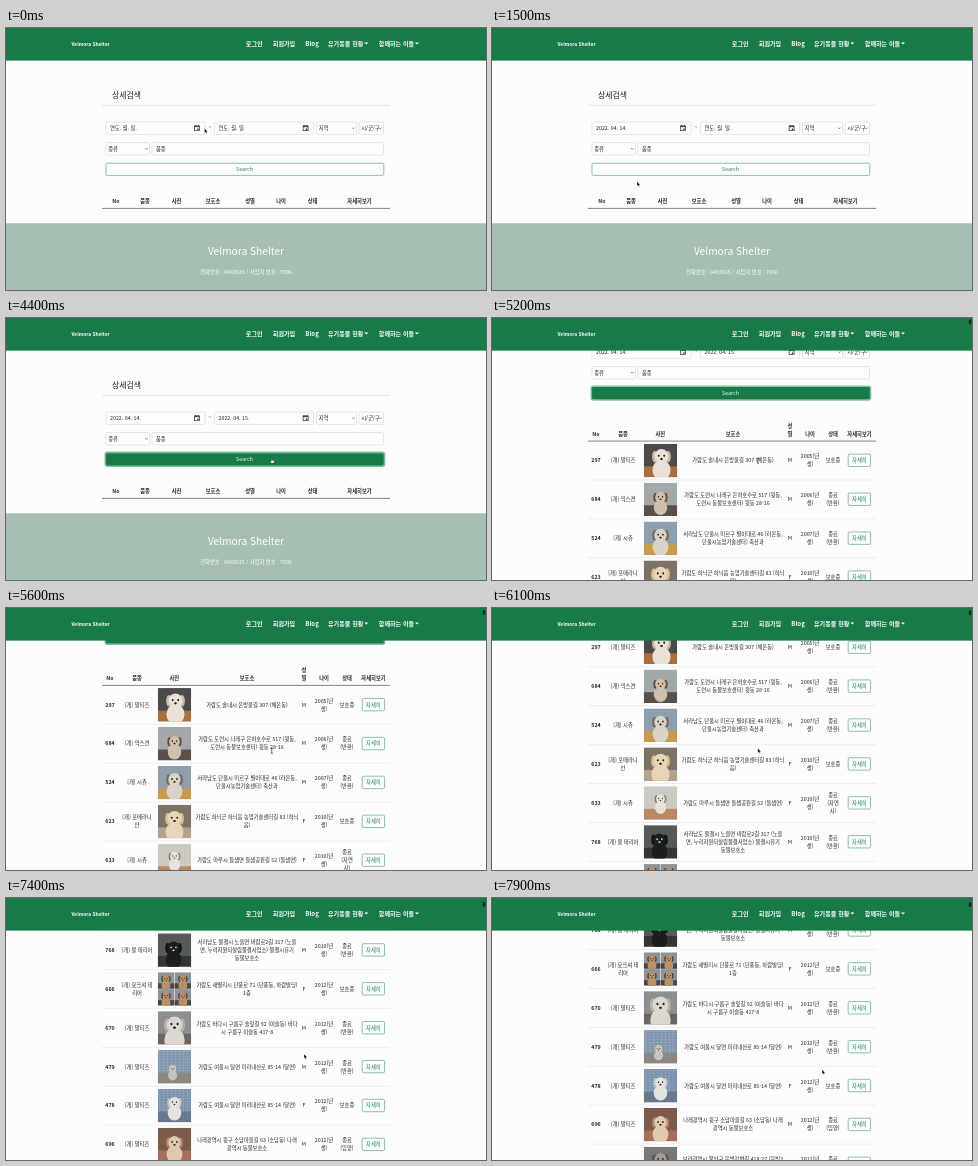
Recreate the animation shown at these times as an HTML page. Size 480 by 262 pixels, loop 8000 ms.

```html
<!DOCTYPE html>
<html lang="ko">
<head>
<meta charset="utf-8">
<title>상세검색</title>
<style>
html, body { margin: 0; width: 100%; height: 100%; overflow: hidden; background: #fcfcfc; }
svg { display: block; }
text { font-family: "Noto Sans CJK KR", "Noto Sans CJK", "Noto Sans", sans-serif; white-space: pre; }
</style>
</head>
<body>
<svg id="stage" width="100%" height="100%" viewBox="0 0 480 262"></svg>
<script>
const LOOP = 8000, ROW = 38.9, TOP = 189.2;
const GREEN = '#187a47', INK = '#23272b', BORDER = '#c9cdd2';
const BRAND = 'Velmora Shelter';
const $ = id => document.getElementById(id);

// y is the visual middle of the line
const text = (s, x, y, o = {}) => {
  const { size = 5.3, fill = INK, weight = 400, anchor = 'start' } = o;
  return `<text x="${x}" y="${y + size * 0.37}" font-size="${size}" fill="${fill}" font-weight="${weight}" text-anchor="${anchor}">${s}</text>`;
};
const mid = (s, x, y, o) => text(s, x, y, { anchor: 'middle', ...o });
const lines = (s, x, y, o) => {
  const parts = s.split('/');
  return parts.map((p, i) => mid(p, x, y + (i - (parts.length - 1) / 2) * 8, o)).join('');
};
const rect = (x, y, w, h, fill, more = '') =>
  `<rect x="${x}" y="${y}" width="${w}" height="${h}" fill="${fill}" ${more}/>`;
const rule = (y, color, w = 0.5) =>
  `<path d="M96 ${y}H384" stroke="${color}" stroke-width="${w}"/>`;
const box = (x, y, w, h = 12.4) =>
  rect(x, y, w, h, '#fff', `fill-opacity=".5" rx="1.3" stroke="${BORDER}" stroke-width=".5"`);
const dot = (x, y, rx, ry, fill) =>
  `<ellipse cx="${x}" cy="${y}" rx="${rx}" ry="${ry}" fill="${fill}"/>`;

const dateField = (x, id) => box(x, 94, 99) +
  `<g id="${id}"></g>` +
  `<g transform="translate(${x + 88.3} 97.2)">
    <rect x=".3" y=".7" width="5" height="4.8" fill="none" stroke="#111" stroke-width=".6"/>
    <path d="M.3 1.5H5.3M1.4 0V1M4.2 0V1" stroke="#111" stroke-width=".8"/>
    <rect x="3" y="3.4" width="1.4" height="1.3" fill="#111"/></g>`;
const select = (x, y, w, label) => box(x, y, w) + text(label, x + 2.2, y + 6.2) +
  `<path d="M${x + w - 4.4} ${y + 5.5}l1.3 1.3l1.3 -1.3" fill="none" stroke="#444" stroke-width=".6"/>`;

function form() {
  return text('상세검색', 106, 67, { size: 7.9 }) + rule(77.3, '#c8c8c8') +
    dateField(100, 'date1') + mid('~', 204, 99) + dateField(208.5, 'date2') +
    select(310.5, 94, 40, '지역') + select(353, 94, 24.5, '시/군/구') +
    select(100, 114.6, 43.5, '종류') + box(146, 114.6, 231.5) + text('품종', 150, 120.8) +
    rect(99.2, 134.2, 279.4, 14, 'none', 'id="ring" rx="2" stroke="#198754" stroke-opacity=".5" stroke-width="1.4"') +
    rect(100, 135.2, 277.8, 12.2, 'none', 'id="btn" rx="1.3" stroke="#198754" stroke-width=".5"') +
    `<g id="btnText">${mid('Search', 238.5, 141.3, { fill: 'inherit' })}</g>`;
}

const HEADS = ['No', '품종', '사진', '보호소', '성별', '나이', '상태', '자세히보기'];
const WIDE = [110, 139, 170.5, 207, 244, 275, 306.5, 353.5];
const COLS = [104, 131, 168.3, 241, 298, 318, 341, 367.5];

function emptyTable() {
  return HEADS.map((h, i) => mid(h, WIDE[i], 173.5, { weight: 700 })).join('') +
    rule(180.4, '#333', 0.6) +
    rect(0, 195.3, 480, 67, '#a5bfb2') +
    mid(BRAND, 240, 223.7, { size: 10.2, fill: '#fff' }) +
    mid('전화번호 : 0483615 / 사업자 번호 : 7096', 240, 244, { fill: '#fff' });
}

const ANIMALS = [
  '297|[개] 말티즈|가람도 솔내시 은방울길 307 (해온동)|M|2005|보호중',
  '684|[개] 믹스견|가람도 도련시 나래구 은하호수로 517 (윗동,/도련시 동물보호센터) 윗동 28-16|M|2006|종료/(반환)',
  '524|[개] 시츄|서라남도 단울시 미르구 별이대로 46 (라온동,/단울시농업기술센터) 축산과|M|2007|종료/(반환)',
  '623|[개] 포메라니/안|가람도 하늬군 하늬읍 농업기술센터길 83 (하늬/읍)|F|2010|보호중',
  '633|[개] 시츄|가람도 마루시 들샘면 들샘공원길 52 (들샘면)|F|2010|종료/(자연/사)',
  '768|[개] 불 테리어|서라남도 물결시 노을면 바람로2길 317 (노을/면, 누리자원되살림물결사업소) 물결시유기/동물보호소|M|2010|종료/(반환)',
  '666|[개] 요크셔 테/리어|가람도 새별리시 단풍로 71 (단풍동, 하람빌딩)/1층|F|2012|보호중',
  '670|[개] 말티즈|가람도 바다시 구름구 솔잎길 92 (이슬동) 바다/시 구름구 이슬동 417-8|M|2012|종료/(반환)',
  '479|[개] 말티즈|가람도 여울시 달면 미리내산로 85-14 (달면)|M|2012|종료/(반환)',
  '478|[개] 말티즈|가람도 여울시 달면 미리내산로 85-14 (달면)|F|2012|보호중',
  '696|[개] 말티즈|나래광역시 윗구 소담마을길 63 (소담동) 나래/광역시 동물보호소|M|2012|종료/(입양)',
  '702|[개] 푸들|보라광역시 물안구 은빛강변길 418-27 (은빛2/동)|M|2012|종료/(반환)'
].map(s => s.split('|'));

// wall, floor, fur, ears, head x, head y, head radius, kind
const PHOTOS = [
  ['#4b4a49', '#a8703f', '#e9e1d6', '#c9b8a4', 18, 13, 8],
  ['#a3a8aa', '#59504b', '#cfc0ae', '#6a4a38', 17, 15, 6],
  ['#8fa0ad', '#c79a4c', '#d9d2c8', '#77685b', 17, 14, 7],
  ['#7d7266', '#b3a28c', '#e8d5b5', '#d8bd92', 17, 14, 8],
  ['#c9c6bf', '#b88a61', '#e6e2db', '#85766a', 17, 13, 5, 'cage'],
  ['#55595a', '#343636', '#1c1d1e', '#101112', 16, 15, 7],
  ['#8d9396', '#4a4541', '#b89068', '#3d322b', 17, 14, 8, 'grid'],
  ['#8b8f90', '#6b6661', '#dcd8d1', '#b8b0a6', 17, 14, 9],
  ['#7e94ad', '#8c8781', '#c8c4bd', '#9c948a', 15, 19, 4, 'cage'],
  ['#7890ad', '#69788c', '#e4e2de', '#c5c0b8', 17, 14, 6, 'cage'],
  ['#7d5a49', '#a56f58', '#e0c9b2', '#b98a6c', 17, 15, 7],
  ['#777879', '#4d4946', '#a39a92', '#5b504a', 17, 13, 7]
];

function pet(fur, ear, x, y, r) {
  const eye = fur === '#1c1d1e' ? '#d8d8d4' : '#1d1917';
  return dot(x, y + r * 1.7, r * 1.15, r * 1.3, fur) +
    dot(x - r * 0.85, y, r * 0.35, r * 0.75, ear) + dot(x + r * 0.85, y, r * 0.35, r * 0.75, ear) +
    dot(x, y, r * 0.9, r * 0.95, fur) +
    dot(x - r * 0.35, y - r * 0.1, r * 0.12, r * 0.14, eye) + dot(x + r * 0.35, y - r * 0.1, r * 0.12, r * 0.14, eye) +
    dot(x, y + r * 0.32, r * 0.17, r * 0.13, eye);
}

function photo([wall, floor, fur, ear, x, y, r, kind], top) {
  let scene = rect(0, 0, 34, 34, wall) + rect(0, 23, 34, 11, floor) + pet(fur, ear, x, y, r);
  if (kind === 'cage')
    for (let i = 2; i < 34; i += 4)
      scene += `<path d="M${i} 0V24M0 ${i * 0.7}H34" stroke="#eef2f6" stroke-opacity=".35" stroke-width=".4"/>`;
  if (kind === 'grid') {
    const tile = scene;
    scene = '';
    for (let i = 0; i < 4; i++)
      scene += `<g transform="translate(${i % 2 * 17.2} ${(i >> 1) * 17.2}) scale(.49)">${tile}</g>`;
  }
  return `<svg x="151.8" y="${top}" width="33.4" height="33.4" viewBox="0 0 34 34">${scene}</svg>`;
}

function results() {
  let out = HEADS.map((h, i) => h === '성별'
    ? mid('성', COLS[i], 174, { weight: 700 }) + mid('별', COLS[i], 182, { weight: 700 })
    : mid(h, COLS[i], 182, { weight: 700 })).join('') + rule(TOP, '#333', 0.6);
  ANIMALS.forEach(([no, breed, place, sex, year, state], i) => {
    const top = TOP + i * ROW, y = top + ROW / 2 - 0.2;
    out += mid(no, COLS[0], y, { weight: 700 }) + lines(breed, COLS[1], y) +
      photo(PHOTOS[i], top + 2.7) + lines(place, COLS[3], y) + mid(sex, COLS[4], y) +
      lines(year + '(년/생)', COLS[5], y) + lines(state, COLS[6], y) +
      rect(356.2, y - 6.2, 22.4, 12.4, 'none', 'rx="1.3" stroke="#198754" stroke-width=".5"') +
      mid('자세히', 367.4, y, { fill: '#198754' }) + rule(top + ROW, '#dadee2');
  });
  return out;
}

const cellX = c => 8.6 + c * 9.25, cellY = r => 28.5 + r * 9.4;

function calendar() {
  const arrow = (x, d) => `<path d="M${x} ${7.5 - 2.6 * d}V${7.5 + 2.6 * d}M${x - 2.5} ${7.5}L${x} ${7.5 - 2.6 * d}L${x + 2.5} 7.5" fill="none" stroke="#444" stroke-width=".6"/>`;
  let out = rect(0.8, 1.4, 72.5, 92.5, '#000', 'opacity=".22" filter="url(#blur)"') +
    rect(0, 0, 72.5, 92.6, '#fff', 'stroke="#a8a8a8" stroke-width=".6"') +
    text('2022년 4월', 3.4, 7.2, { size: 4, weight: 700 }) +
    '<path d="M24 6.4h2.8l-1.4 1.8z" fill="#222"/>' + arrow(53.7, 1) + arrow(64, -1) +
    rect(0, 0, 9.2, 9.2, '#eee', 'id="cell"');
  [...'일월화수목금토'].forEach((d, c) => out += mid(d, cellX(c), 19.2, { size: 4 }));
  for (let i = 0; i < 42; i++) {
    const n = i < 5 ? 27 + i : i < 35 ? i - 4 : i - 34;
    const fill = i < 5 || i > 34 ? '#8a8a8a' : '#222';
    out += `<g class="day" fill="${fill}">${mid(n, cellX(i % 7), cellY(i / 7 | 0), { size: 4, fill: 'inherit' })}</g>`;
  }
  return out + rect(cellX(4) - 4.6, cellY(4) - 4.6, 9.2, 9.2, 'none', 'stroke="#777" stroke-width=".6"') +
    mid('삭제', 10.8, 85.4, { size: 4, fill: '#1a6bc4' }) + mid('오늘', 61.8, 85.4, { size: 4, fill: '#1a6bc4' });
}

function navbar() {
  const item = (s, x) => text(s, x, 15.6, { size: 6.1, weight: 900, fill: '#fff' });
  const caret = x => `<path d="M${x} 14.4h4l-2 2z" fill="#fff"/>`;
  return rect(0, 0, 480, 32.6, GREEN) +
    text(BRAND, 65.5, 15.8, { size: 4.8, weight: 700, fill: '#fff' }) +
    item('로그인', 239.8) + item('회원가입', 266.8) + item('Blog', 299.3) +
    item('유기동물 현황', 322) + caret(358.3) + item('함께하는 이들', 372.8) + caret(409);
}

$('stage').innerHTML = `
  <defs><filter id="blur" x="-20%" y="-20%" width="140%" height="140%"><feGaussianBlur stdDeviation="1.4"/></filter></defs>
  ${rect(0, 0, 480, 262, '#fcfcfc')}
  <g id="page">${form()}<g id="empty">${emptyTable()}</g><g id="list">${results()}</g></g>
  <g id="cal">${calendar()}</g>
  ${navbar()}
  ${rect(476.8, 1, 2.4, 5, '#222', 'id="thumb" rx="1.2"')}
  <g id="pointer">
    <path id="arrow" d="M0 0V4.6L1.1 3.7L1.8 5.3L2.6 4.9L1.9 3.4H3.3Z" fill="#000" stroke="#fff" stroke-width=".4"/>
    <path id="hand" d="M-.5 .4Q0 -.3 .5 .4V1.9L2.2 2.3Q2.7 2.5 2.6 3.2L2.2 5H-.5L-1.9 3.2Q-1.8 2.4 -.5 3Z" fill="#fff" stroke="#111" stroke-width=".45"/>
    <path id="beam" d="M-.9 0Q0 0 0 .6Q0 0 .9 0M0 .5V4.6M-.9 5.1Q0 5.1 0 4.5Q0 5.1 .9 5.1" fill="none" stroke="#111" stroke-width=".6"/>
  </g>`;

const SCROLL = [[4800, 0], [5200, 66], [5500, 102], [5850, 136], [6100, 169], [6500, 256.2], [6800, 300], [7300, 347], [7900, 371]];
const MOVES = [
  [100, 198.5, 100.3], [300, 191, 99.5], [500, 191, 99.5], [1100, 145, 153.5], [1600, 145, 153.5],
  [2100, 299.5, 99.5], [2300, 299.5, 99.5], [2700, 271.5, 152.5], [2900, 264, 153.5], [3300, 264, 153.5],
  [4000, 265.8, 140.3], [6900, 265.8, 140.3], [7900, 330, 171.5]
];

function at(keys, t, k, ease = u => u) {
  if (t <= keys[0][0]) return keys[0][k];
  for (let i = 1; i < keys.length; i++) {
    const a = keys[i - 1], b = keys[i];
    if (t < b[0]) return a[k] + (b[k] - a[k]) * ease((t - a[0]) / (b[0] - a[0]));
  }
  return keys[keys.length - 1][k];
}
const smooth = u => u * u * (3 - 2 * u);
const show = (id, on) => $(id).setAttribute('display', on ? 'inline' : 'none');
const set = (id, name, value) => $(id).setAttribute(name, value);
const move = (id, x, y) => set(id, 'transform', `translate(${x} ${y})`);
const days = document.querySelectorAll('.day');

function setDate(id, x, value) {
  if ($(id).textContent !== value) $(id).innerHTML = text(value, x, 100.2);
}

function drawCalendar(t, x, y) {
  const first = t >= 400 && t < 1500, second = t >= 2200 && t < 3300;
  show('cal', first || second);
  const left = first ? 100 : 208.5;
  move('cal', left, 107);
  const col = Math.round((x - left - 8.6) / 9.25), row = Math.round((y - 107 - 28.5) / 9.4);
  const over = col >= 0 && col < 7 && row >= 0 && row < 6;
  const pressed = first ? t >= 1300 : t >= 2900;
  show('cell', (first || second) && over);
  move('cell', cellX(col) - 4.6, cellY(row) - 4.6);
  set('cell', 'fill', pressed ? '#1a62c9' : '#e9edf2');
  days.forEach((d, i) => d.style.fill = pressed && i === row * 7 + col ? '#fff' : '');
}

function draw(t) {
  const scroll = at(SCROLL, t, 1);
  const x = at(MOVES, t, 1, smooth), y = at(MOVES, t, 2, smooth);
  const loaded = t >= 4600, hot = t >= 4000;

  move('page', 0, -scroll);
  show('empty', !loaded);
  show('list', loaded);
  setDate('date1', 104, t < 1500 ? '연도. 월. 일.' : '2022. 04. 14.');
  setDate('date2', 212.5, t < 3300 ? '연도. 월. 일.' : '2022. 04. 15.');
  set('btn', 'fill', hot ? GREEN : 'none');
  set('btnText', 'fill', hot ? '#fff' : '#198754');
  show('ring', t >= 4300);
  drawCalendar(t, x, y);

  show('thumb', scroll > 0);
  set('thumb', 'y', 1 + scroll * 0.008);

  const pageY = y + scroll, row = Math.floor((pageY - TOP) / ROW);
  const hand = hot && pageY < 148;
  let beam = false;
  if (loaded && row >= 0 && row < ANIMALS.length && x > 190 && x < 292) {
    const reach = ANIMALS[row][2].split('/').length * 4;
    beam = Math.abs(pageY + 2 - TOP - (row + 0.5) * ROW) < reach;
  }
  show('hand', hand);
  show('beam', beam && !hand);
  show('arrow', !hand && !beam);
  move('pointer', x, y);
}

function tick() {
  draw(performance.now() % LOOP);
  requestAnimationFrame(tick);
}
tick();
</script>
</body>
</html>
```
